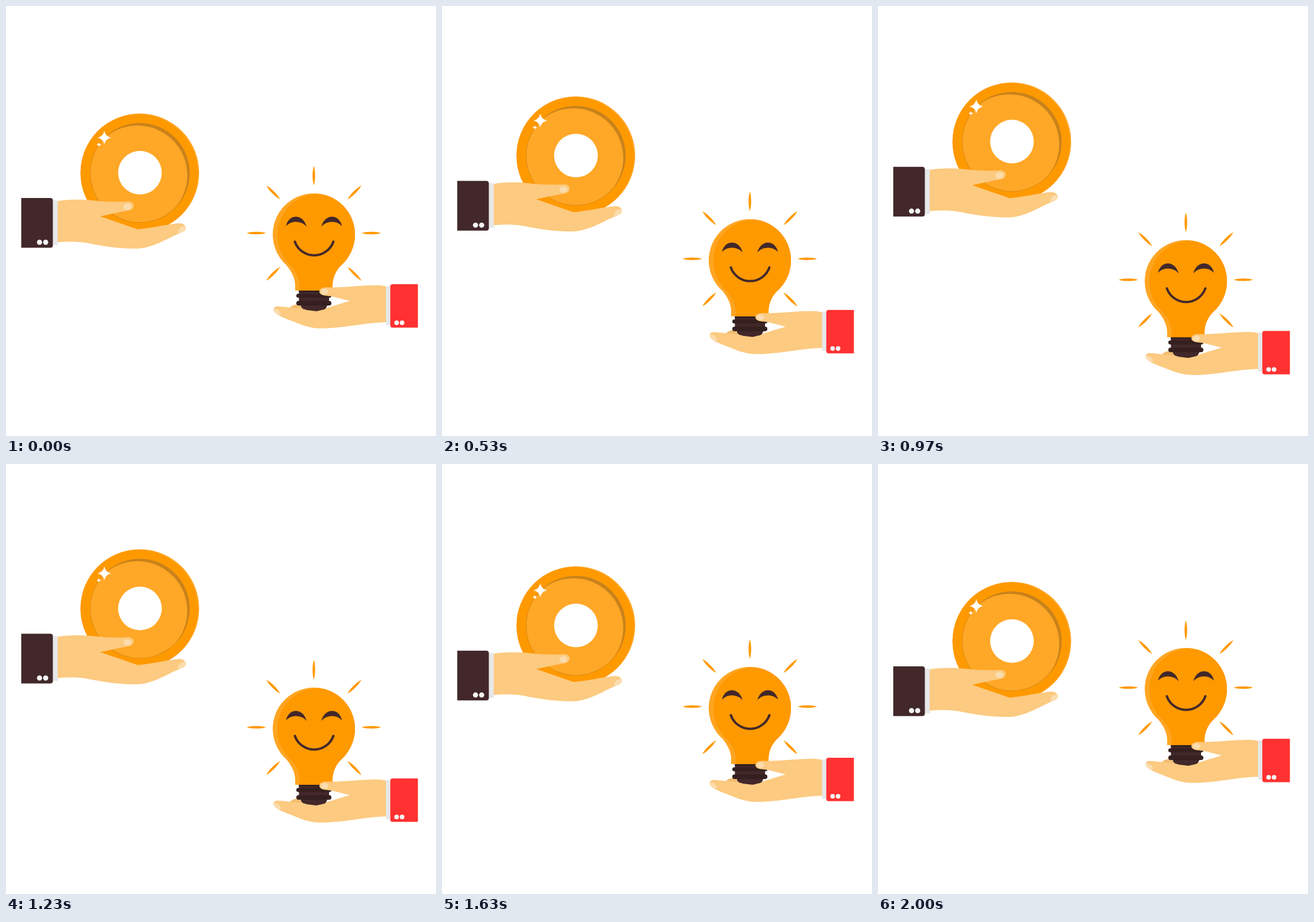
These frames come from a looping animation (748x748 px, 2.5 s). An HTML page:

```html
<!DOCTYPE html>
<html lang="en">
<head>
<meta charset="utf-8">
<title>Coin and idea</title>
<style>
  html, body { margin: 0; height: 100%; overflow: hidden; background: #fff; }
  svg { display: block; width: 100vw; height: 100vh; }
  .dark { fill: #42282a; }
  .darker { fill: #35201f; }
  .skin { fill: #fcca80; }
  .nail { fill: #fbdcae; }
  .cuff { fill: #e6e7e8; }
  .button { fill: #f5f5f5; }
  .orange { fill: #ff9900; }
  .glow { fill: #ffa522; }
</style>
</head>
<body>
<svg viewBox="0 0 748 748">
  <defs>
    <path id="glass" d="M503 495V486C503 474 497 462 488 451A71.5 71.5 0 1 1 583 451C574 460 568 472 568 486V495Z"/>
    <clipPath id="glassClip"><use href="#glass"/></clipPath>
    <clipPath id="coinClip"><circle cx="232.8" cy="290.3" r="103.2"/></clipPath>
    <clipPath id="faceClip"><circle cx="232.8" cy="290.3" r="86"/></clipPath>
  </defs>

  <g id="coin">
    <circle class="glow" cx="232.8" cy="290.3" r="103.2"/>
    <circle class="orange" cx="230.5" cy="291.5" r="103.2" clip-path="url(#coinClip)"/>
    <circle fill="#c9821b" cx="232.8" cy="290.3" r="86.7"/>
    <circle fill="#ffa726" cx="228.6" cy="294.5" r="86.7" clip-path="url(#faceClip)"/>
    <circle fill="#fff" cx="233" cy="290" r="38"/>
    <path fill="#fff" d="M171 217Q173 227 183 229Q173 231 171 241Q169 231 159 229Q169 227 171 217Z
      M161.5 237Q162 240.5 166 241Q162 241.5 161.5 245Q161 241.5 157 241Q161 240.5 161.5 237Z"/>
    <path class="skin" d="M89 339.500C105 336 130 336 150 338C175 341 195 341 214 340Q222 341 222 348Q221 355 212 356
      Q190 360 164 366L229 388.500C255 386 280 380 300 378Q311 377 313 386Q313 391 305 394C280 404 255 422 226 422
      C190 422 160 416 140 412C120 409 105 410 89 411Z"/>
    <ellipse class="nail" cx="211" cy="349" rx="7" ry="5.500"/>
    <path class="nail" d="M299 394C300 386 306 382 312.500 383.500Q314 390 305 394Q301 395.500 299 394Z"/>
    <rect class="cuff" x="80" y="338" width="10" height="78"/>
    <path class="dark" d="M26.500 334H77Q81.500 334 81.500 338.500V416Q81.500 420.500 77 420.500H26.500Z"/>
    <circle class="button" cx="58.300" cy="411" r="4.500"/>
    <circle class="button" cx="69" cy="411" r="4.500"/>
  </g>

  <g id="bulb">
    <g id="rays" class="orange"></g>
    <path fill="#f3bd70" d="M492 527Q498 518 510 519.500L520 530Z"/>
    <path class="dark" d="M509.500 494H562V520H559.500L553 533H522L513 523V520H509.500Z"/>
    <g class="darker">
      <rect x="509.500" y="494" width="52.500" height="4"/>
      <rect x="505" y="500.500" width="61" height="7" rx="3.500"/>
      <rect x="505" y="513" width="61" height="8" rx="4"/>
    </g>
    <use class="glow" href="#glass"/>
    <g clip-path="url(#glassClip)">
      <use class="orange" href="#glass" x="8" y="1"/>
      <rect class="orange" x="540" y="328" width="70" height="168"/>
    </g>
    <path class="dark" d="M487 383C492 361 517 361 523 384C514 373 496 373 487 383Z
      M584.500 383C579.500 361 554.500 361 548.500 384C557.500 373 575.500 373 584.500 383Z"/>
    <path fill="none" stroke="#42282a" stroke-width="4" stroke-linecap="round" d="M502.500 410A35.500 35.500 0 0 0 569.500 410"/>
    <path class="skin" d="M663 488.500C655 486 648 485.500 635 486C610 486.500 590 490 555 489.500Q546 490 545 497
      Q546 502 553 503.500L566 505L598 513L560 524.500L553 528L540 531L524 529L513 526C495 525 485 523 471 522.500
      Q464 524 466 531C470 538 485 543 500 549C518 556 530 562 560 560.500C595 559 630 550 663 550Z"/>
    <ellipse class="nail" cx="554" cy="497" rx="6.500" ry="5"/>
    <path class="nail" d="M466 526.500C472 526 477 530 478.500 536.500Q477 538.500 473 537Q464 532 466 526.500Z"/>
    <rect class="cuff" x="661" y="487" width="9" height="68"/>
    <path fill="#ff3131" d="M716.500 484H672.500Q668.500 484 668.500 488V555.500Q668.500 559.500 672.500 559.500H716.500Z"/>
    <circle class="button" cx="679.500" cy="551" r="4"/>
    <circle class="button" cx="689" cy="551" r="4"/>
  </g>
</svg>
<script>
  const byId = id => document.getElementById(id);

  // Seven rays around the glass; the bottom one is left out.
  byId("rays").innerHTML = Array.from({ length: 7 }, (_, i) =>
    `<path d="M83 0C92 -3 108 -3 117 0C108 3 92 3 83 0Z" transform="translate(535.5 395) rotate(${45 - i * 45})"/>`
  ).join("");

  // Straight moves: first second to the far point, next second to the end.
  const lift = (s, far, end) => s < 1 ? far * s : far + (end - far) * (s - 1);
  const move = (id, y) => byId(id).setAttribute("transform", `translate(0 ${y})`);

  function draw(now) {
    const t = now % 2500;
    // 30 steps a second, timed in hundredths, then a rest at the end.
    const step = Math.min(60, Math.floor((Math.floor(t / 10) + 0.5) * 0.3));
    const s = step / 30;
    move("coin", lift(s, -56, 18));
    move("bulb", lift(s, 84, -6));
  }

  const start = performance.now();
  function tick() {
    draw(performance.now() - start);
    requestAnimationFrame(tick);
  }
  tick();
</script>
</body>
</html>
```
